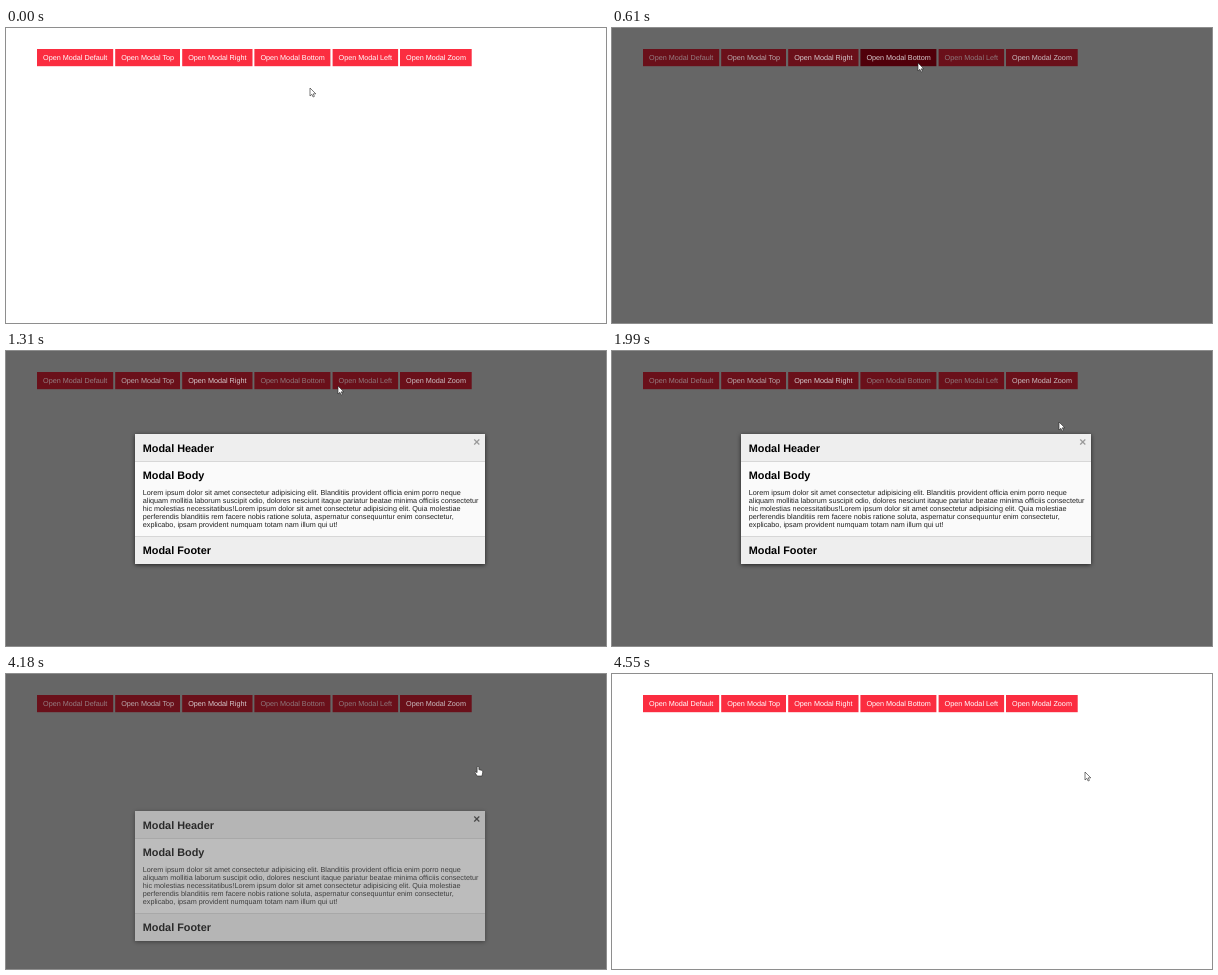
These frames come from a looping animation (600 px wide and 295 px high, 4.63 s). An HTML page:

```html
<!DOCTYPE html>
<html lang="en">
<head>
<meta charset="utf-8">
<title>Modal demo</title>
<style>
  html, body { margin: 0; width: 100%; height: 100%; overflow: hidden; background: #fff; }
  svg { display: block; width: 600px; height: 295px; }
  text { font: 7.24px "Liberation Sans", Arial, sans-serif; text-rendering: geometricPrecision; }
  .title { font-size: 10.86px; font-weight: bold; fill: #000; }
  .copy { fill: #222; }
  #close { font-size: 12px; font-weight: bold; text-anchor: middle; }
  #modal { filter: drop-shadow(0 1.5px 2px rgba(0, 0, 0, .65)); }
  .cursor { fill: #fff; stroke: #222; stroke-width: .6; stroke-linejoin: round; }
</style>
</head>
<body>
<svg viewBox="0 0 600 295">
  <rect id="shade" width="600" height="295" fill="#666"/>
  <g id="buttons"></g>
  <g id="modal">
    <rect x="129" y="83" width="350" height="130" fill="#eee"/>
    <rect x="129" y="110.5" width="350" height="75" fill="#fafafa"/>
    <path d="M129 110.5H479M129 185.5H479" stroke="#ccc" stroke-width=".7"/>
    <text class="title" x="136.8" y="100.6">Modal Header</text>
    <text class="title" x="136.8" y="127.8">Modal Body</text>
    <text class="title" x="136.8" y="203">Modal Footer</text>
    <g id="copy"></g>
    <text id="close" x="470.8" y="95.3">×</text>
  </g>
  <path id="arrow" class="cursor" d="M0 0V8L1.9 6.3 3.1 9 4.4 8.4 3.3 5.8H5.8Z"/>
  <path id="hand" class="cursor" d="M-.9 6V.8Q0-.5.9.8V3.6L4 4.4Q4.9 4.8 4.8 6L4 10H-.8L-3 6.6Q-2.6 5.2-.9 6.6Z"/>
</svg>
<script>
const LOOP = 4630;
const OPEN = 610, CLOSE = 4180, GONE = 4320;
const SLACK = 5;
const TRAVEL = 130;

const $ = id => document.getElementById(id);
const add = (parent, tag, attrs, label = '') => {
  const el = document.createElementNS('http://www.w3.org/2000/svg', tag);
  for (const key in attrs) el.setAttribute(key, attrs[key]);
  el.textContent = label;
  return parent.appendChild(el);
};
const show = (el, on) => { el.style.display = on ? '' : 'none'; };

// name, left, width, label colour while shaded
const buttons = [
  ['Default', 31, 76.2, '#947c80'],
  ['Top', 109.2, 64.8, '#b8a8ab'],
  ['Right', 176.2, 70.3, '#d6cacd'],
  ['Bottom', 248.4, 76, '#8d787c'],
  ['Left', 326.6, 65.5, '#8d787c'],
  ['Zoom', 394, 71.7, '#c9bcc0']
].map(([name, x, width, dim]) => ({
  name, dim,
  box: add($('buttons'), 'rect', { x, y: 21, width, height: 17.2 }),
  label: add($('buttons'), 'text', { x: x + 6, y: 32.2 }, 'Open Modal ' + name)
}));

[
  'Lorem ipsum dolor sit amet consectetur adipisicing elit. Blanditiis provident officia enim porro neque',
  'aliquam mollitia laborum suscipit odio, dolores nesciunt itaque pariatur beatae minima officiis consectetur',
  'hic molestias necessitatibus!Lorem ipsum dolor sit amet consectetur adipisicing elit. Quia molestiae',
  'perferendis blanditiis rem facere nobis ratione soluta, aspernatur consequuntur enim consectetur,',
  'explicabo, ipsam provident numquam totam nam illum qui ut!'
].forEach((line, i) => add($('copy'), 'text', { class: 'copy', x: 136.8, y: 144 + i * 8.1 }, line));

// first step, last step, step count, target x, target y, easing power
const moves = [
  [70, 380, 5, 306, 35, .7],
  [1000, 1460, 7, 362, 36, 2.28],
  [1540, 1760, 4, 426, 62, .9],
  [1910, 1990, 2, 447, 71, 1],
  [2140, 2600, 7, 473, 79, .9],
  [2680, 3160, 7, 472, 92, .8],
  [4480, 4550, 2, 473, 98, 1]
];

function stepOf(t, from, to, count) {
  if (t < from) return 0;
  const gap = (to - from) / (count - 1);
  return Math.min(count, Math.floor((t - from + SLACK) / gap) + 1);
}

function pointer(t) {
  let x = 304, y = 60;
  for (const [from, to, count, tx, ty, power] of moves) {
    const p = (stepOf(t, from, to, count) / count) ** power;
    x += (tx - x) * p;
    y += (ty - y) * p;
    if (p < 1) break;
  }
  return [Math.round(x), Math.round(y)];
}

// how far the modal has come in, 0 to 1
function presence(t) {
  if (t < OPEN || t >= GONE) return 0;
  if (t >= CLOSE) return [.585, .2][stepOf(t, CLOSE, GONE, 3) - 1] || 0;
  return [0, .46, .8, 1][stepOf(t, OPEN, 840, 4) - 1];
}

function render(t) {
  const shaded = t >= OPEN && t < GONE;
  const [x, y] = pointer(t);
  const overButton = y < 39 && t < OPEN;
  const overClose = shaded && x > 465 && y >= 87;

  show($('shade'), shaded);
  for (const { name, dim, box, label } of buttons) {
    const active = name === 'Bottom' && y < 39 && t < 690;
    box.style.fill = shaded ? (active ? '#50000a' : '#6a101a') : (active ? '#c8001b' : '#fb2d40');
    label.style.fill = shaded ? (active ? '#d8c8cc' : dim) : '#fff';
  }

  const p = presence(t);
  show($('modal'), p > 0);
  $('modal').style.opacity = p;
  $('modal').setAttribute('transform', `translate(0 ${Math.round((1 - p) * TRAVEL)})`);
  $('close').style.fill = overClose ? '#333' : '#999';

  const pointing = overButton || overClose;
  show($('arrow'), !pointing);
  show($('hand'), pointing);
  for (const id of ['arrow', 'hand']) $(id).setAttribute('transform', `translate(${x} ${y})`);
}

const start = performance.now();
function tick() {
  render((performance.now() - start) % LOOP);
  requestAnimationFrame(tick);
}
tick();
</script>
</body>
</html>
```
